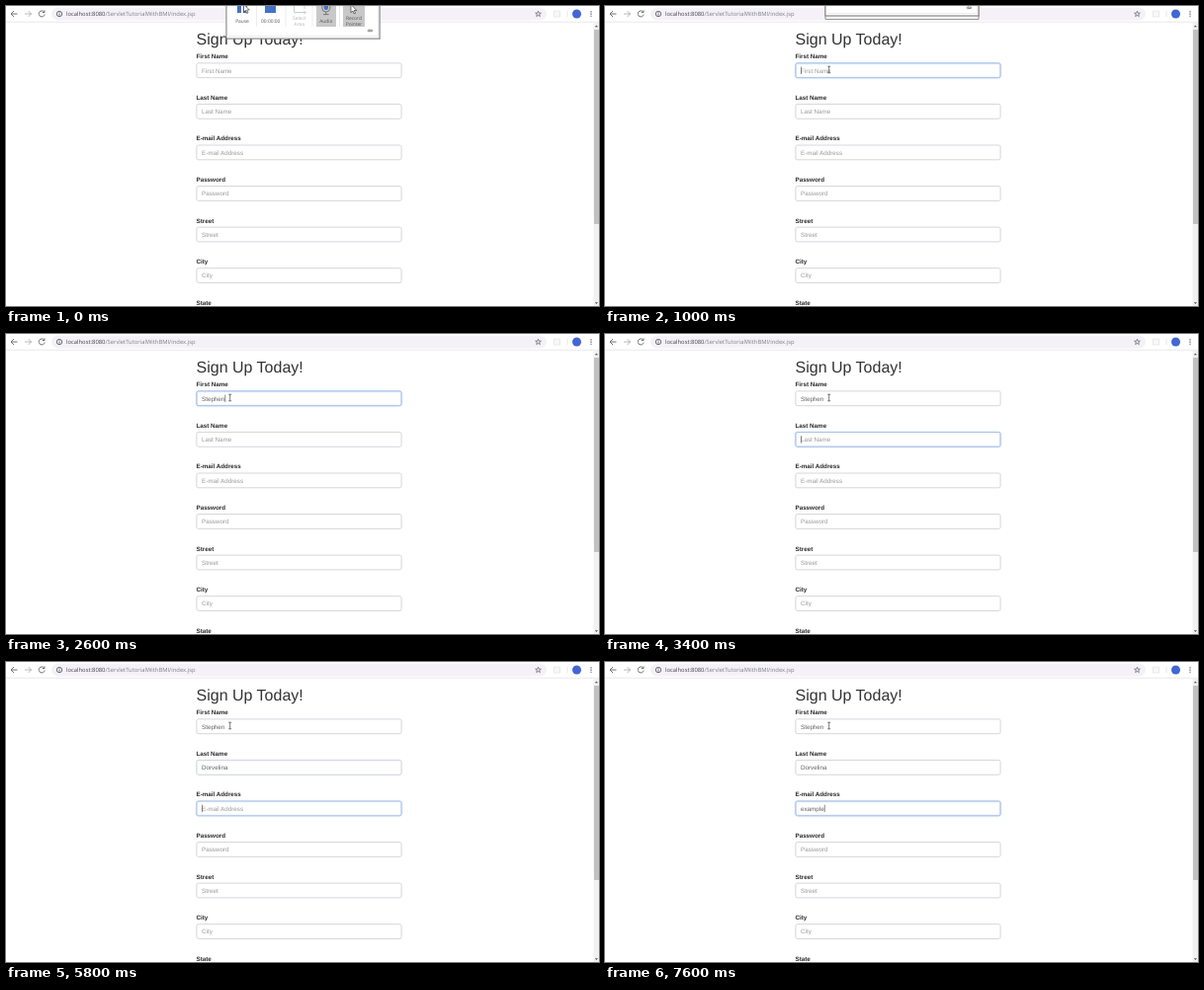
Animation of 600x304 px, one loop 8000 ms. Source, as an HTML page:

```html
<!DOCTYPE html>
<html lang="en">
<head>
<meta charset="utf-8">
<title>Sign-up form</title>
<style>
  html, body { margin: 0; width: 100%; height: 100%; overflow: hidden; background: #fff; }
  svg { display: block; width: 600px; height: 304px; }
  text { font-family: "Liberation Sans", Arial, sans-serif; font-size: 6.25px; text-rendering: geometricPrecision; white-space: pre; }
  .ui { font-family: "Open Sans", "Noto Sans", sans-serif; }
  .url { font-size: 5.85px; fill: #7c7f84; }
  .title { font-size: 16px; fill: #333; }
  .label { font-weight: bold; fill: #2a2a2a; }
  .box { fill: #fff; stroke: #d3d1d9; stroke-width: .9; }
  .glow { fill: none; stroke: #a3c3f1; stroke-width: .9; filter: drop-shadow(0 0 .8px rgba(140, 185, 240, .45)); }
  .icon { fill: none; stroke: #5f6368; stroke-width: .9; }
  .cap { font-size: 4.9px; text-anchor: middle; fill: #555; }
  .dim { fill: #b4b4b4; }
</style>
</head>
<body>
<svg viewBox="0 0 600 304">
  <defs>
    <path id="arrow" d="M0 0V8.2L1.9 6.5L3.2 9.4L4.5 8.8L3.2 6H5.8Z" fill="#fff" stroke="#222" stroke-width=".6"/>
    <path id="beam" d="M-1.5 -3.3H1.5M0 -3.3V3.3M-1.5 3.3H1.5" fill="none" stroke="#444" stroke-width=".7"/>
  </defs>

  <rect width="600" height="304" fill="#fff"/>
  <text class="title" x="192.5" y="38.8">Sign Up Today!</text>
  <g id="form"></g>
  <rect id="caret" width=".7" height="7.4" fill="#555"/>

  <!-- browser toolbar -->
  <rect width="600" height="16" fill="#fff"/>
  <rect x="46" y="1.5" width="501" height="13" rx="6.5" fill="#f4f2f8"/>
  <path d="M0 16.2H600" stroke="#e4e3e8" stroke-width=".8"/>
  <path class="icon" d="M11.5 8H5M8 5L5 8L8 11"/>
  <path class="icon" d="M19 8H25.5M22.5 5L25.5 8L22.5 11" opacity=".5"/>
  <path class="icon" d="M38.6 6A3 3 0 1 0 39.2 8.6M39 4.4V6.6H36.8"/>
  <circle class="icon" cx="54" cy="8" r="2.7" stroke-width=".7"/>
  <path class="icon" d="M54 7.5V9.7M54 6.1V6.8" stroke-width=".7"/>
  <text class="ui url" x="61" y="10.2"><tspan fill="#404247">localhost:8080</tspan>/ServletTutorialWithBMI/index.jsp</text>
  <path class="icon" transform="translate(538.5 8) scale(.82)" d="M0 -3.4L.9 -1H3.5L1.5 .6L2.2 3.1L0 1.7L-2.2 3.1L-1.5 .6L-3.5 -1H-.9Z"/>
  <rect x="554.5" y="5" width="6" height="6" fill="#f8f8f8" stroke="#e2e2e2" stroke-width=".7"/>
  <path d="M568 4.5V11.5" stroke="#dddce2" stroke-width=".7"/>
  <circle cx="577.5" cy="8" r="4.5" fill="#4266d3"/>
  <path d="M592 5.2V10.8" stroke="#5f6368" stroke-width="1.3" stroke-dasharray="1.2 1.05"/>

  <!-- scrollbar -->
  <rect x="594.5" y="16.5" width="5.5" height="287.5" fill="#f1f1f1"/>
  <rect x="595" y="24" width="5" height="197" fill="#c1c1c1"/>
  <path d="M595.8 21.2L597.4 19.4L599 21.2Z M595.8 300.2L597.4 302L599 300.2Z" fill="#555"/>

  <!-- recorder panel -->
  <g id="panel">
    <path id="trail" d="M223 20V36.5H378V20" fill="#fff" stroke="#8f8f8f"/>
    <rect x="222.5" y="-20" width="156.5" height="54" fill="#777" opacity=".35"/>
    <rect x="223" y="-20" width="155" height="53" fill="#fff" stroke="#858585"/>
    <path d="M225 30.6H376.4V-20" fill="none" stroke="#ddd" stroke-width=".6"/>
    <path d="M253.5 -8V21M283 -8V21M310 -8V21M337.5 -8V21" stroke="#e6e6e6" stroke-width=".7"/>
    <rect x="314" y="-10" width="20" height="31" fill="#c8c8c8"/>
    <rect x="341" y="-10" width="22" height="31" fill="#c8c8c8"/>
    <path d="M234 -4H238V7H234ZM240 -4H244V7H240Z" fill="#4472c4"/>
    <rect x="262" y="-4" width="11" height="11" fill="#4472c4"/>
    <path d="M291.5 -3V6.5H302M302 -3V3M300.3 6.5H304M302 4.6V8.4" fill="none" stroke="#c9cdd6"/>
    <rect x="321.6" y="-6" width="4.4" height="10" rx="2.2" fill="#4472c4"/>
    <path d="M319.8 0V2A4 4 0 0 0 327.8 2V0M323.8 6V8.6M321 8.6H326.6" fill="none" stroke="#666" stroke-width=".8"/>
    <use href="#arrow" x="349" y="-1.5"/>
    <text class="ui cap" x="239" y="16.6">Pause</text>
    <text class="ui cap" x="267.7" y="16.6">00:00:00</text>
    <text class="ui cap dim" x="296.8" y="14">Select</text>
    <text class="ui cap dim" x="296.8" y="19.6">Area</text>
    <text class="ui cap" x="323.8" y="16.6">Audio</text>
    <text class="ui cap" x="352" y="14">Record</text>
    <text class="ui cap" x="352" y="19.6">Pointer</text>
    <path d="M365.6 25H367.2M367.2 23.6V26.4M367.4 25.6H370.4V24.2H367.4" fill="none" stroke="#777" stroke-width=".8"/>
  </g>

  <use id="pointer" href="#arrow"/>
</svg>
<script>
  const LOOP = 8000, STEP = 200, PITCH = 41.55;
  const $ = id => document.getElementById(id);

  function make(tag, attrs, text = "") {
    const el = document.createElementNS("http://www.w3.org/2000/svg", tag);
    for (const key in attrs) el.setAttribute(key, attrs[key]);
    el.textContent = text;
    return $("form").appendChild(el);
  }

  const labels = ["First Name", "Last Name", "E-mail Address", "Password", "Street", "City", "State"];
  const fields = labels.map((label, i) => {
    const y = i * PITCH;
    const box = { x: 192.9, y: 57.9 + y, width: 207.2, height: 14.8, rx: 1.8 };
    make("text", { class: "label", x: 192.5, y: 53.3 + y }, label);
    make("rect", { class: "box", ...box });
    return {
      label, y,
      glow: make("rect", { class: "glow", ...box, opacity: 0 }),
      text: make("text", { x: 198, y: 67.5 + y })
    };
  });

  // focus time, then [time, letters typed]
  const entries = [
    { focus: 800, value: "Stephen", keys: [[1800, 1], [2000, 3], [2200, 4], [2400, 6], [2600, 7]] },
    { focus: 3000, value: "Dorvelina", keys: [[3800, 1], [4000, 2], [4200, 3], [4400, 4], [4600, 5], [5000, 6], [5200, 8], [5400, 9]] },
    { focus: 5800, value: "example", keys: [[6800, 1], [7000, 2], [7200, 4], [7400, 5], [7600, 7]] }
  ];
  const caretOff = [[0, 800], [1400, 1800], [3200, 3400], [4800, 5000], [6400, 6800]];

  const clamp = (v, max) => Math.min(Math.max(v, 0), max);
  const glowLevel = (t, start) => t < start ? 0 : t < start + STEP ? .85 : 1;

  function drawForm(t) {
    let active = 0;
    fields.forEach((field, i) => {
      const entry = entries[i];
      let typed = "";
      if (entry) {
        const next = entries[i + 1];
        if (t >= entry.focus) active = i;
        for (const [at, count] of entry.keys) if (t >= at) typed = entry.value.slice(0, count);
        field.glow.setAttribute("opacity", glowLevel(t, entry.focus) - (next ? glowLevel(t, next.focus) : 0));
      }
      field.text.textContent = typed || field.label;
      field.text.setAttribute("fill", typed ? "#606060" : "#999");
      field.end = typed ? field.text.getComputedTextLength() : 0;
    });

    const { end, y } = fields[active];
    $("caret").setAttribute("x", 198.2 + end);
    $("caret").setAttribute("y", 61.6 + y);
    $("caret").setAttribute("opacity", caretOff.some(([a, b]) => t >= a && t < b) ? 0 : 1);
  }

  // the pointer leaves the panel for the first field, then the panel slides away
  function drawOverlay(t) {
    const rise = clamp((t - 780) * .105, 60);
    $("panel").setAttribute("transform", `translate(0 ${-rise})`);
    $("trail").setAttribute("opacity", rise > 5 ? 1 : 0);

    const p = clamp(t / 800, 1), ease = p * p * (3 - 2 * p);
    const x = 240.5 - 13.8 * ease, y = -2 + 66.5 * ease;
    $("pointer").setAttribute("href", y > 57 ? "#beam" : "#arrow");
    $("pointer").setAttribute("transform", `translate(${x} ${y})`);
  }

  const start = performance.now();
  function tick() {
    const now = (performance.now() - start) % LOOP;
    const t = Math.floor(now / STEP) * STEP;
    drawForm(t);
    drawOverlay(t);
    requestAnimationFrame(tick);
  }
  tick();
</script>
</body>
</html>
```
